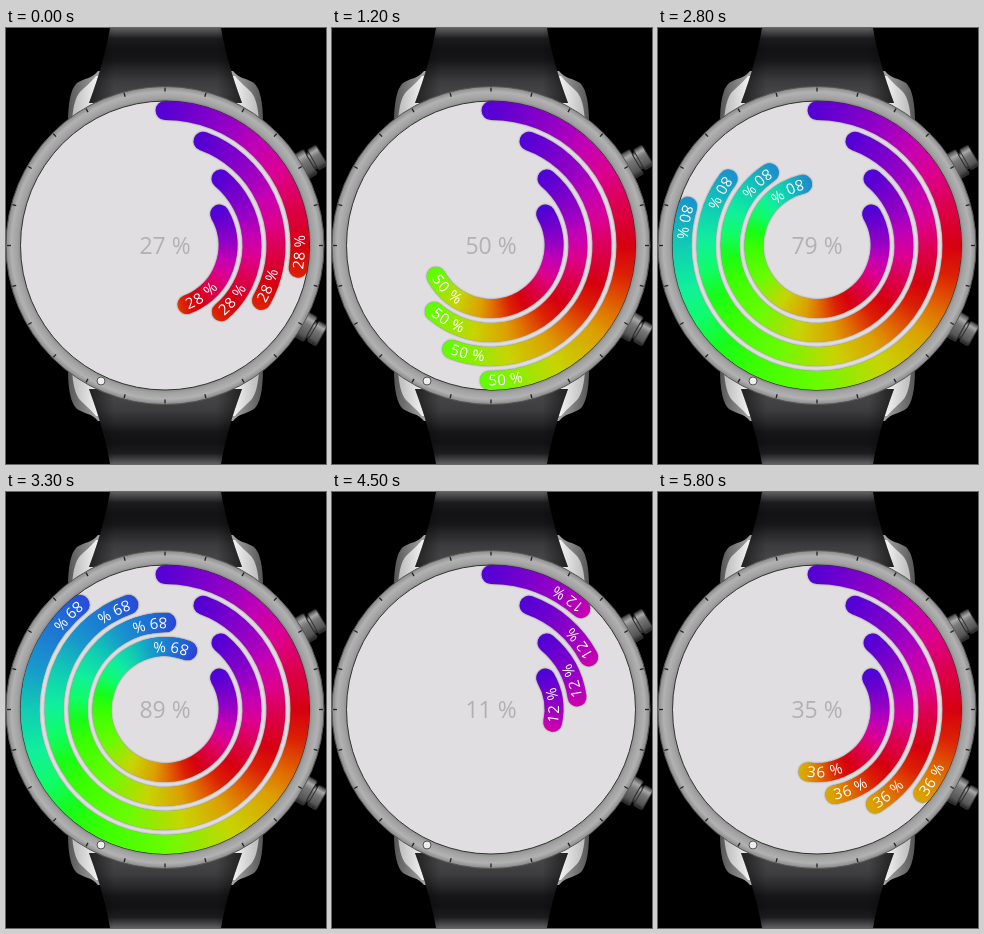
Animation of 320x436 px, one loop 5.9 s. Source, as an HTML page with a canvas:

```html
<!DOCTYPE html>
<html>
<head>
<meta charset="utf-8">
<style>
html, body { margin: 0; width: 320px; height: 436px; overflow: hidden; background: #000; }
canvas { display: block; }
</style>
</head>
<body>
<canvas id="stage" width="320" height="436"></canvas>
<script>
const c = document.getElementById('stage').getContext('2d');
const TAU = Math.PI * 2, CX = 159, CY = 217.5, LOOP = 5900, STEP = 100;
const FONT = '"Open Sans", "Noto Sans", sans-serif';

// Progress in percent over time in ms; it wraps at 100.
const KEYS = [[0, 27.7], [1200, 50.2], [2000, 65.7], [2800, 79.7], [3700, 96.7], [4500, 111.6], [5900, 137.5]];

const HUES = [
  [0, '#5800d4'], [.08, '#9800c4'], [.12, '#c400b4'], [.16, '#dc0090'], [.2, '#dc0050'],
  [.25, '#d60010'], [.285, '#dc2004'], [.33, '#e07000'], [.36, '#dca000'], [.42, '#c8d400'],
  [.46, '#98e800'], [.5, '#68fc00'], [.58, '#38ff00'], [.62, '#18fc18'], [.66, '#10fc68'],
  [.7, '#10f09c'], [.75, '#10ccb4'], [.8, '#1898cc'], [.88, '#2060d8'], [.97, '#4408dc'], [1, '#5800d4']
];

function fillStops(gradient, stops) {
  for (const [at, color] of stops) gradient.addColorStop(at, color);
  return gradient;
}

const linear = (x0, y0, x1, y1, ...colors) => fillStops(
  c.createLinearGradient(x0, y0, x1, y1),
  colors.map((color, i) => [i / (colors.length - 1), color]));

function disc(x, y, r, fill, stroke) {
  c.beginPath();
  c.arc(x, y, r, 0, TAU);
  c.fillStyle = fill;
  c.fill();
  if (stroke) {
    c.strokeStyle = stroke;
    c.lineWidth = 1;
    c.stroke();
  }
}

function shape(path, fill) {
  c.fillStyle = fill;
  c.fill(new Path2D(path));
}

function strapHalf() {
  const strap = 'M104 0H215C219 24 226 48 236 75H83C93 48 100 24 104 0Z';
  shape('M92 43C86 51 78 50 71 55Q62 63 62 95H257Q257 63 248 55C241 50 233 51 227 43Z',
    linear(62, 0, 257, 0, '#555', '#aaa', '#777', '#777', '#777', '#aaa', '#555'));
  shape('M90 48C84 55 78 60 74 64Q67 72 66 95H253Q252 72 245 64C241 60 235 55 229 48Z',
    linear(66, 0, 253, 0, '#bbb', '#fff', '#bbb', '#bbb', '#bbb', '#fff', '#bbb'));
  shape(strap, linear(0, 0, 0, 64, '#606062', '#1c1c1e', '#121214', '#161618', '#2a2a2c', '#3c3c3e', '#444446'));
  shape(strap, linear(83, 0, 236, 0, '#0008', '#0000', '#0000', '#0000', '#0000', '#0000', '#0008'));
}

function block(x, w, h) {
  c.fillStyle = linear(0, -h / 2, 0, h / 2, '#444', '#a8a8a8', '#777', '#666', '#555', '#222');
  c.beginPath();
  c.roundRect(x, -h / 2, w, h, 2);
  c.fill();
  c.strokeStyle = '#333';
  c.lineWidth = 1;
  c.stroke();
}

function pusher(angle) {
  c.save();
  c.translate(CX, CY);
  c.rotate(angle);
  block(154, 14, 28);
  block(168, 4, 18);
  block(171, 10, 23);
  c.restore();
}

function drawWatch() {
  c.fillStyle = '#000';
  c.fillRect(0, 0, 320, 436);
  strapHalf();
  c.save();
  c.translate(0, 436);
  c.scale(1, -1);
  strapHalf();
  c.restore();
  pusher(-Math.PI / 6);
  pusher(Math.PI / 6);

  disc(CX, CY, 159, fillStops(c.createRadialGradient(CX, CY, 144, CX, CY, 159),
    [[0, '#8c8c8c'], [.25, '#a2a2a2'], [.65, '#b2b2b2'], [1, '#8a8a8a']]), '#555');
  c.strokeStyle = '#222';
  c.lineWidth = 1.3;
  for (let i = 0; i < 24; i++) {
    const a = i * TAU / 24, s = Math.sin(a), k = Math.cos(a);
    c.beginPath();
    c.moveTo(CX + 154 * s, CY - 154 * k);
    c.lineTo(CX + 158 * s, CY - 158 * k);
    c.stroke();
  }
  disc(95, 353, 4, '#eee', '#555');
  disc(CX, CY, 144.5, '#e0dee1', '#333');
}

function arc(r, from, to, shadow) {
  c.shadowColor = shadow ? '#0008' : 'transparent';
  c.shadowBlur = 2;
  c.beginPath();
  c.arc(CX, CY, r, from - TAU / 4, to - TAU / 4);
  c.stroke();
  c.shadowColor = 'transparent';
}

// Letters run backwards from the arc's end, their tops facing the centre.
function arcLabel(text, r, end) {
  c.font = '15px ' + FONT;
  c.fillStyle = '#fff';
  let a = end + 1 / r;
  for (const ch of text) {
    const half = c.measureText(ch).width / 2 / (r - 5);
    a -= half;
    c.save();
    c.translate(CX, CY);
    c.rotate(a - Math.PI);
    c.fillText(ch, 0, r + 5);
    c.restore();
    a -= half;
  }
}

function drawRing(i, value) {
  const r = 135 - 24 * i, start = i * TAU / 18, sweep = value / 100 * TAU, end = start + sweep;
  c.strokeStyle = fillStops(c.createConicGradient(start - TAU / 4, CX, CY), HUES);
  c.lineWidth = 18.8;
  c.lineCap = 'round';
  arc(r, start, end, true);
  if (value > 85) { // keep the leading cap above the tail
    arc(r, end - .2, end, true);
    arc(r, end - .7, end, false);
  }
  c.lineCap = 'butt';
  if (sweep * r > 30) arcLabel(Math.round(value) + ' %', r, end);
}

function valueAt(t) {
  const i = KEYS.findIndex(key => key[0] > t);
  const [t0, v0] = KEYS[i - 1], [t1, v1] = KEYS[i];
  return (v0 + (v1 - v0) * (t - t0) / (t1 - t0)) % 100;
}

function draw(t) {
  const value = valueAt(t);
  drawWatch();
  c.textAlign = 'center';
  c.textBaseline = 'alphabetic';
  for (let i = 0; i < 4; i++) drawRing(i, value);
  c.font = '23px ' + FONT;
  c.fillStyle = '#b2b0b3';
  c.fillText(Math.floor(value) + ' %', CX, 226);
}

const begin = performance.now();
function tick() {
  const t = (performance.now() - begin) % LOOP;
  draw(Math.floor(t / STEP) * STEP);
  requestAnimationFrame(tick);
}
tick();
</script>
</body>
</html>
```
